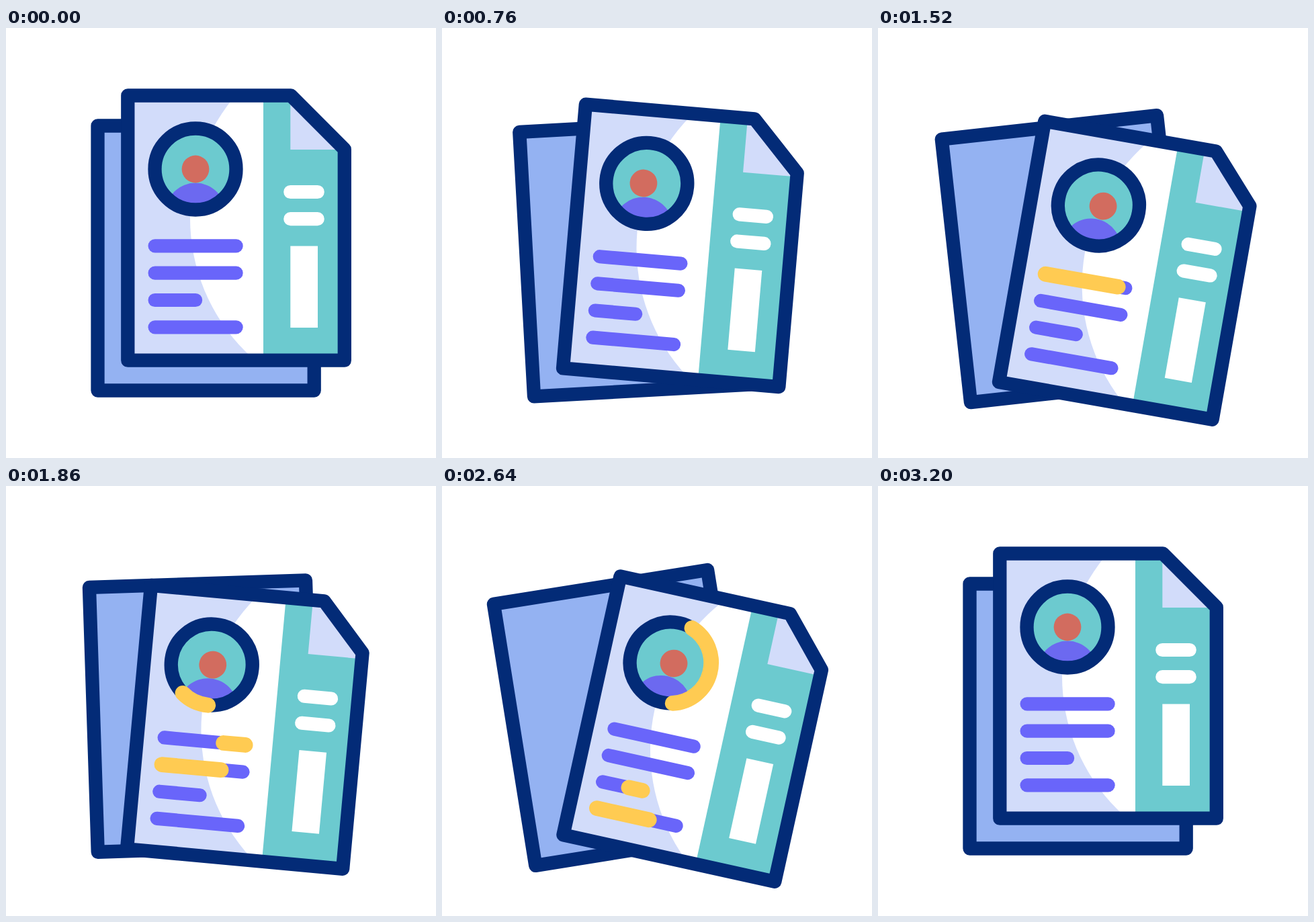
Write an HTML page that moves like this. It is 640 px wide and 640 px high and loops after 3.6 s.

```html
<!DOCTYPE html>
<html lang="en">
<head>
<meta charset="utf-8">
<title>Résumé sheets</title>
<style>
  html, body { margin: 0; width: 100%; height: 100%; overflow: hidden; background: #fff; }
  svg { display: block; width: 100vw; height: 100vh; }
  .edge { fill: none; stroke: #032b77; stroke-width: 20.3; stroke-linejoin: round; }
  .bars { stroke: #6965fa; stroke-width: 20.2; stroke-linecap: round; }
  .pills { stroke: #fff; stroke-width: 20.2; stroke-linecap: round; }
  .glow { fill: none; stroke: #ffcb52; stroke-width: 22.8; stroke-linecap: round; }
</style>
</head>
<body>
<svg viewBox="0 0 640 640">
  <defs>
    <clipPath id="page"><path class="outline"/></clipPath>
    <clipPath id="porthole"><circle cx="282" cy="210" r="55"/></clipPath>
  </defs>
  <g id="back">
    <path class="edge" style="fill:#94b2f2" d="M136.5 145.5H458.7V539.5H136.5Z"/>
  </g>
  <g id="front">
    <g clip-path="url(#page)">
      <path fill="#d2dcfa" d="M181 100H504V495H181Z"/>
      <circle cx="554" cy="283" r="280" fill="#fff"/>
      <path fill="#6ccacf" d="M383 100H504V495H383Z"/>
      <path id="flap" fill="#d2dcfa"/>
    </g>
    <path class="edge outline"/>
    <circle cx="282" cy="210" r="55" fill="#6ccacf"/>
    <g clip-path="url(#porthole)">
      <circle cx="282" cy="275" r="44.5" fill="#6c69f0"/>
    </g>
    <circle id="head" cx="282" cy="210" r="20.4" fill="#d26c5f"/>
    <circle class="edge" cx="282" cy="210" r="60.5"/>
    <path class="pills" d="M423.3 244H463.7M423.3 284.2H463.7"/>
    <path fill="#fff" d="M423.3 324.5H464V446H423.3Z"/>
    <g id="lines"></g>
    <path id="arc" class="glow"/>
  </g>
</svg>
<script>
const LOOP = 3600, START = 400, END = 3200, BEAT = 400;
const RING = { x: 282, y: 210, r: 60.5 };
const LEFT = 221.6, LINE = 121;

const $ = id => document.getElementById(id);
const outlines = document.querySelectorAll(".outline");

// Eased progress from 0 to 1 between two times
function span(t, from, to) {
  const u = Math.min(1, Math.max(0, (t - from) / (to - from)));
  return (1 - Math.cos(Math.PI * u)) / 2;
}

// Eased path through key poses given as [time, value]
const pose = (t, ...keys) => keys.slice(1).reduce((value, [time, next], i) =>
  value + (next - keys[i][1]) * span(t, keys[i][0], time), keys[0][1]);

// Head leans left and right in turn, every 600 ms
function lean(t) {
  if (t <= START || t >= END) return 0;
  const step = Math.floor((t - START) / 600);
  const at = i => i === 0 || START + 600 * i > END ? 0 : i % 2 ? -7.4 : 7.4;
  const from = START + 600 * step, to = Math.min(END, from + 600);
  return at(step) + (at(step + 1) - at(step)) * span(t, from, to);
}

const bars = [0, 1, 2, 3].map(i => {
  const add = name => {
    const el = document.createElementNS("http://www.w3.org/2000/svg", "path");
    el.setAttribute("class", name);
    $("lines").append(el);
    return el;
  };
  const y = 324.4 + 40.3 * i, length = i === 2 ? LINE / 2 : LINE;
  add("bars").setAttribute("d", `M${LEFT} ${y}h${length}`);
  return { y, length, start: 1200 + BEAT * i, el: add("glow") };
});

function ringPoint(turn) {
  const a = Math.PI * (.5 + 2 * turn);
  return `${RING.x + RING.r * Math.cos(a)} ${RING.y + RING.r * Math.sin(a)}`;
}

function draw(t) {
  const lift = span(t, START, 1200) - span(t, 2600, END);
  const frontTurn = pose(t, [START, 0], [1240, 12.6], [1940, 5], [2600, 12.6], [END, 0]);
  const backTurn = pose(t, [440, 0], [1240, 9.1], [1900, 1.8], [1980, 1.8], [2640, 9.1], [3100, 0]);
  $("front").setAttribute("transform", `translate(0 ${60.4 * lift}) rotate(${frontTurn} 342 473)`);
  $("back").setAttribute("transform", `rotate(${-backTurn} 297.5 535)`);

  const open = Math.min(1, 1.4 * lift);
  const x = 424 + 16 * open, y = 180.5 - 8.5 * open;
  for (const el of outlines)
    el.setAttribute("d", `M181.3 100.5H${x}L503.8 ${y}V494.7H181.3Z`);
  $("flap").setAttribute("d", `M423.3 181V100H${x}L504 ${y}V181Z`);
  $("head").setAttribute("cx", RING.x + lean(t));

  for (const { y, length, start, el } of bars) {
    const head = span(t, start, start + BEAT), tail = span(t, start + BEAT, start + 2 * BEAT);
    el.setAttribute("d", head > tail ? `M${LEFT + length * tail} ${y}h${length * (head - tail)}` : "");
  }
  const head = span(t, 1600, 2800), tail = span(t, 2000, END);
  $("arc").setAttribute("d", head > tail
    ? `M${ringPoint(tail)}A${RING.r} ${RING.r} 0 ${head - tail > .5 ? 1 : 0} 1 ${ringPoint(head)}` : "");
}

const began = performance.now();
function tick() {
  draw((performance.now() - began) % LOOP);
  requestAnimationFrame(tick);
}
tick();
</script>
</body>
</html>
```
